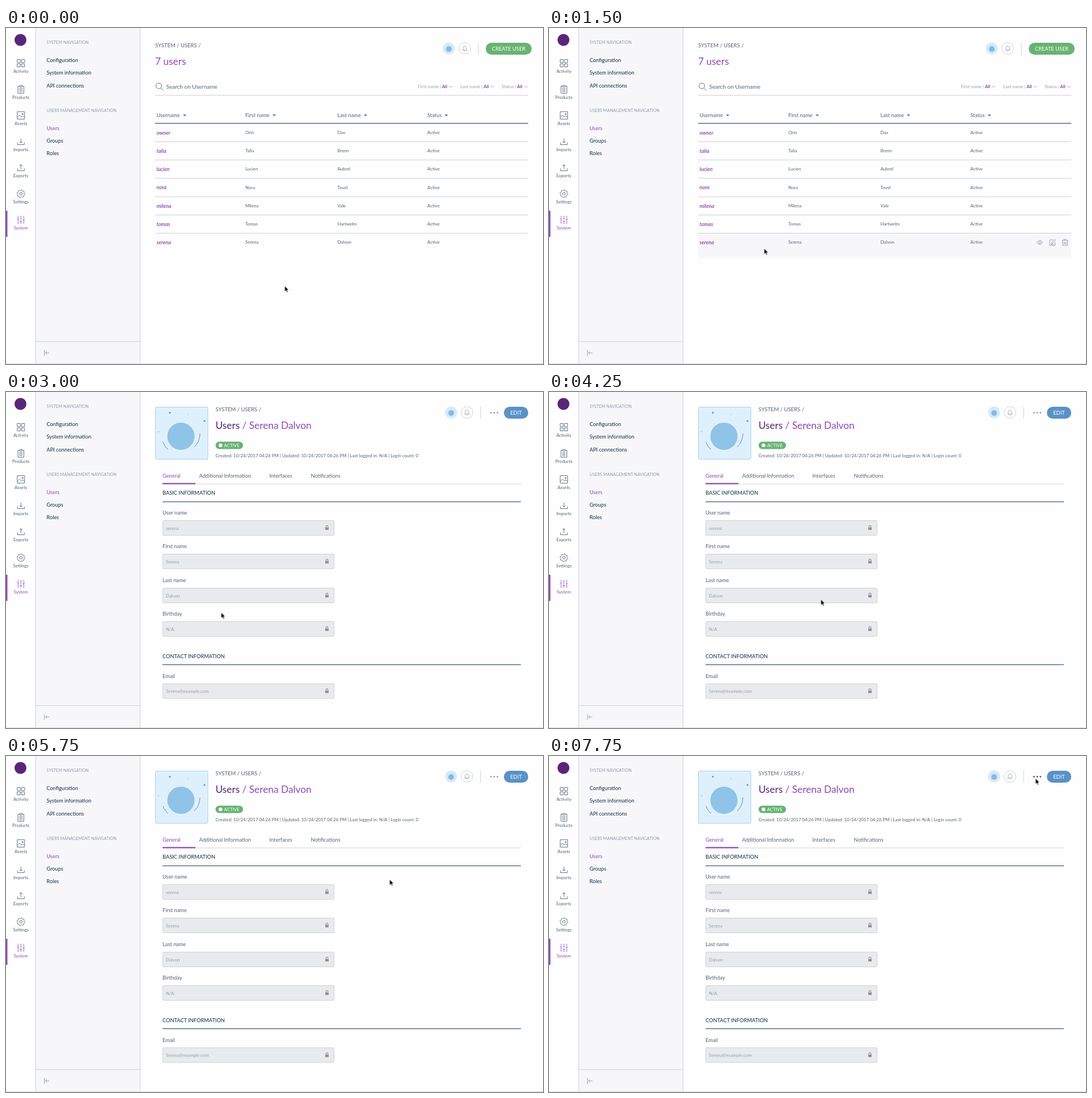
An HTML page that plays this animation: 947x592 px, repeating every 8 s.

```html
<!DOCTYPE html>
<html lang="en">
<head>
<meta charset="utf-8">
<title>User administration</title>
<style>
  html, body { margin: 0; width: 100%; height: 100%; overflow: hidden; background: #fefefe; }
  svg { display: block; font-family: Lato, "Open Sans", sans-serif; }
  text { white-space: pre; }
  .mid { text-anchor: middle; }
  .user { font-weight: 600; font-style: italic; }
  .icon { fill: none; stroke: #54637a; stroke-width: .9; }
  .soft { stroke: #949dac; }
  .brand { stroke: #9452ba; }

  #list, #hover, #veil, #detail, #dots, #cursor { animation: 8s step-end infinite; }
  #list { animation-name: list; }
  #hover { animation-name: hover; }
  #veil { animation-name: veil; }
  #detail { animation-name: detail; }
  #dots { animation-name: dots; }
  #cursor { animation-name: cursor; }

  @keyframes list { 0% { opacity: 1 } 34.375%, 100% { opacity: 0 } }
  @keyframes hover { 0% { opacity: 0 } 12.5% { opacity: .3 } 15.625%, 100% { opacity: 1 } }
  @keyframes veil { 0% { opacity: 0 } 34.375% { opacity: 1 } 37.5%, 100% { opacity: 0 } }
  @keyframes detail { 0% { opacity: 0 } 37.5%, 100% { opacity: 1 } }
  @keyframes dots { 0% { fill: #949dac } 93.75%, 100% { fill: #4f5b73 } }
  @keyframes cursor {
    0% { transform: translate(491.5px, 454.5px) }
    6.25% { transform: translate(411.5px, 419.5px) }
    9.375% { transform: translate(389.5px, 401px) }
    12.5% { transform: translate(381px, 391.5px) }
    15.625% { transform: translate(379.5px, 389.5px) }
    18.75% { transform: translate(379.5px, 388.5px) }
    46.875% { transform: translate(390.5px, 387px) }
    50% { transform: translate(441.5px, 380px) }
    53.125% { transform: translate(479.5px, 365.5px) }
    56.25% { transform: translate(518.5px, 344.5px) }
    59.375% { transform: translate(552.5px, 323.5px) }
    65.625% { transform: translate(590.5px, 303.5px) }
    68.75% { transform: translate(630.5px, 266.5px) }
    71.875% { transform: translate(676.5px, 217.5px) }
    75% { transform: translate(709px, 180.5px) }
    78.125% { transform: translate(709px, 179.5px) }
    81.25% { transform: translate(742px, 162px) }
    84.375% { transform: translate(805px, 117.5px) }
    87.5% { transform: translate(844.5px, 79px) }
    90.625% { transform: translate(856px, 52.5px) }
    93.75% { transform: translate(857px, 41px) }
    96.875%, 100% { transform: translate(858px, 39.5px) }
  }
</style>
</head>
<body>
<svg id="stage" width="947" height="592" viewBox="0 0 947 592"></svg>
<script>
const INK = '#0f2d47', SLATE = '#54637a', GREY = '#949dac', LINE = '#ccd1d8';
const PURPLE = '#9147b8', GREEN = '#67b373', BLUE = '#5992c7';

// cy is the middle of the capitals
const text = (x, cy, size, fill, str, cls = '') =>
  `<text x="${x}" y="${(cy + size * .36).toFixed(2)}" font-size="${size}" fill="${fill}" class="${cls}">${str}</text>`;
const rect = (x, y, w, h, fill, more = '') =>
  `<rect x="${x}" y="${y}" width="${w}" height="${h}" fill="${fill}" ${more}/>`;
const circle = (x, y, r, fill, more = '') =>
  `<circle cx="${x}" cy="${y}" r="${r}" fill="${fill}" ${more}/>`;
const icon = (x, y, d, cls = '') =>
  `<path class="icon ${cls}" transform="translate(${x} ${y})" d="${d}"/>`;
const ring = r => `M${-r} 0a${r} ${r} 0 1 0 ${2 * r} 0a${r} ${r} 0 1 0 ${-2 * r} 0`;

function gear() {
  const points = [];
  for (let i = 0; i < 32; i++) {
    const r = i % 4 < 2 ? 6.9 : 5.7, a = (i + .5) * Math.PI / 16;
    points.push((r * Math.cos(a)).toFixed(2) + ' ' + (r * Math.sin(a)).toFixed(2));
  }
  return 'M' + points.join('L') + 'Z' + ring(2.3);
}

const slider = (x, y) => `M${x}-7V${y - 2}M${x - 2} ${y}h4M${x} ${y}V7`;
const tray = 'M-6 1.5V5.5H6V1.5';
const menu = [
  ['Activity', 'M-6.5-6.5h5.4v5.4h-5.4zM1.1-6.5h5.4v5.4h-5.4zM-6.5 1.1h5.4v5.4h-5.4zM1.1 1.1h5.4v5.4h-5.4z'],
  ['Products', 'M-2-5.3H-5.2V7H5.2V-5.3H2M-2-6.8H2V-4H-2zM-3-1.2H3M-3 1.4H3M-3 4H3'],
  ['Assets', 'M-6.5-6.5h13v13h-13zM-6.5 3.5L-2.5-.5L1 3L3.5.8L6.5 3.6M2-3.2h2v1.5h-2z'],
  ['Imports', tray + 'M0-5V2.5M-2.6 0L0 2.6L2.6 0'],
  ['Exports', tray + 'M0 2.5V-5.3M-2.6-2.7L0-5.3L2.6-2.7'],
  ['Settings', gear()],
  ['System', slider(-5, -2) + slider(0, 2.5) + slider(5, -1)]
];

function navigation() {
  let s = rect(53, 0, 183, 591, '#f7f7f9') + rect(52, 0, 1, 591, LINE) + rect(236, 0, 1, 591, LINE);
  s += rect(53, 552, 183, 1, LINE) + circle(25.5, 21, 10.5, '#5a2578');
  menu.forEach(([label, d], i) => {
    const on = i === 6, y = 62 + 46 * i;
    s += icon(26.3, y, d, on ? 'brand' : '') + text(26.2, y + 14.3, 7.86, on ? PURPLE : SLATE, label, 'mid');
  });
  s += rect(0, 322, 2.5, 46, PURPLE);
  s += text(71.5, 25.7, 7.35, GREY, 'SYSTEM NAVIGATION');
  s += text(71.5, 145.5, 7.35, GREY, 'USERS MANAGEMENT NAVIGATION');
  const links = ['Configuration', 'System information', 'API connections', 'Users', 'Groups', 'Roles'];
  links.forEach((label, i) => {
    const y = i < 3 ? 56.7 + 22.4 * i : 176.3 + 22.4 * (i - 3);
    s += text(71.5, y, 9.25, i === 3 ? PURPLE : INK, label);
  });
  return s + icon(71.5, 572.5, 'M-4-5V5M5 0H-2M1-3L-2 0L1 3', 'soft');
}

// avatar, bell and separator shared by both pages
const tools = x =>
  circle(x, 36, 10.5, '#d4eaf9') + circle(x, 37, 5, '#85b9df') +
  circle(x + 28, 36, 10.3, '#fff', `stroke="${LINE}"`) +
  icon(x + 28, 36, 'M-4.2 3C-2.8 2-3 0-3-1.2C-3-5.4 3-5.4 3-1.2C3 0 2.8 2 4.2 3ZM-1.2 3.4C-.8 5 .8 5 1.2 3.4', 'soft') +
  rect(x + 51.5, 26, 1, 21, LINE);

const button = (x, w, fill, label) =>
  rect(x, 26, w, 21, fill, 'rx="10.5"') + text(x + w / 2, 36.4, 9.25, '#fff', label, 'mid');

const columns = [['Username', 265.5], ['First name', 422], ['Last name', 584.5], ['Status', 743]];
const users = [
  'owner Orin Dax', 'talia Talia Brenn', 'lucien Lucien Aubrel', 'nora Nora Tovel',
  'milena Milena Vale', 'tomas Tomas Hartwelm', 'serena Serena Dalvon'
];

function listPage() {
  let s = text(263, 31, 9.5, SLATE, 'SYSTEM / USERS /') + text(263, 58.6, 17.3, PURPLE, '7 users');
  s += tools(781) + button(846, 81, GREEN, 'CREATE USER');
  s += icon(269.5, 102, ring(5) + 'M3.6 3.6L8 8') + text(282.5, 103.8, 10, SLATE, 'Search on Username');
  [['First name', 726.5, 784], ['Last name', 801, 857.5], ['Status', 874, 917]].forEach(([label, x, end]) => {
    s += text(x, 103.3, 7.95, GREY, `${label} <tspan fill="#763e9e" font-weight="600">: All</tspan>`);
    s += icon(end, 103.3, 'M-3-1.5L0 1.5L3-1.5', 'soft');
  });
  s += rect(263, 118, 658, 1, LINE);
  s += '<g id="hover">' + rect(263, 362, 658, 43, '#f7f7f9') +
    icon(865.5, 377.7, 'M-5.5 0Q0-6.5 5.5 0Q0 6.5-5.5 0' + ring(1.8), 'soft') +
    icon(888, 377.7, 'M1-4.5H-5V5.5H4.5V0M-2 2.5L-1.5 0L4-5.5L5.5-4L0 2ZM-3 3.8H2.5', 'soft') +
    icon(910, 377.7, 'M-5.5-3.5H5.5M-2-3.5V-5.5H2V-3.5M-4.3-3.5V5.5H4.3V-3.5M-2-1V3.5M0-1V3.5M2-1V3.5', 'soft') + '</g>';
  const carets = [315, 473, 634, 776.5];
  columns.forEach(([label, x], i) => {
    s += text(x, 153.6, 9.25, SLATE, label);
    s += `<path d="M${carets[i] - 2.9} 152.6h5.8l-2.9 3z" fill="${SLATE}"/>`;
  });
  s += rect(263, 167.3, 658, 1.4, '#4d607a');
  users.forEach((user, i) => {
    const y = 184.2 + 32.2 * i;
    (user + ' Active').split(' ').forEach((cell, j) => {
      s += j ? text(columns[j][1], y, 7.86, SLATE, cell) : text(265.5, y + .2, 9.3, '#8640ae', cell, 'user');
    });
    if (i < 6) s += rect(263, Math.round(y + 15.8), 658, 1, LINE);
  });
  return s;
}

const lock = (x, y) =>
  rect(x - 3, y - 1, 6, 4.6, '#8a919e', 'rx=".6"') +
  `<path d="M${x - 1.9} ${y - 1}v-1.2a1.9 1.9 0 0 1 3.8 0v1.2" fill="none" stroke="#8a919e" stroke-width="1.1"/>`;

const field = (label, value, y) =>
  text(276, y, 9.3, SLATE, label) +
  rect(276.5, y + 13.5, 302, 26, '#e9eaee', `stroke="${LINE}" rx="1"`) +
  text(282, y + 26.8, 7.9, GREY, value) + lock(566, y + 26.5);

const section = (label, y) =>
  text(276, y, 9.25, INK, label) + rect(276, Math.round(y + 15), 632, 1, '#1f3d57');

function portrait() {
  const star = (x, y) => `M${x - 2} ${y}h4M${x} ${y - 2}v4`;
  return rect(263.5, 26.5, 92.5, 92, '#dff0fd', 'stroke="#a9cfe8" rx="2"') +
    circle(308.5, 78, 24, '#8fc3e8') +
    `<path d="${star(289, 36.5)}${star(350, 51)}M277 88Q279 96 286 101M342 73Q342 87 332 97M268 70h2M320 40h1" fill="none" stroke="#456f95" stroke-width=".8"/>`;
}

function detailPage() {
  let s = portrait() + text(369.5, 31, 9.5, SLATE, 'SYSTEM / USERS /');
  s += text(369.5, 58.6, 17.3, '#52267d', `Users <tspan fill="${PURPLE}">/ Serena Dalvon</tspan>`);
  s += rect(369.5, 87.5, 48.5, 13, GREEN, 'rx="6.5"') + circle(378.3, 94, 3.3, '#fff');
  s += text(384.5, 94, 7.9, '#fff', 'ACTIVE');
  const stamp = '10/24/2017 04:26 PM';
  s += text(369.5, 112.4, 7.88, SLATE, `Created: ${stamp} | Updated: ${stamp} | Last logged in: N/A | Login count: 0`);
  s += tools(785) + button(878, 43, BLUE, 'EDIT');
  s += '<g id="dots">' + [855.3, 861, 866.7].map(x => `<circle cx="${x}" cy="36.5" r="1.4"/>`).join('') + '</g>';
  s += rect(276, 161.5, 632, 1, LINE) + rect(276, 160.3, 58, 2.2, PURPLE);
  [['General', 276], ['Additional Information', 340.5], ['Interfaces', 464.5], ['Notifications', 537.5]]
    .forEach(([label, x], i) => { s += text(x, 147.6, 9.25, i ? SLATE : PURPLE, label); });
  s += section('BASIC INFORMATION', 177.8);
  [['User name', 'serena'], ['First name', 'Serena'], ['Last name', 'Dalvon'], ['Birthday', 'N/A']]
    .forEach(([label, value], i) => { s += field(label, value, 213 + Math.round(59.3 * i)); });
  return s + section('CONTACT INFORMATION', 465.2) + field('Email', 'Serena@example.com', 500.5);
}

const spinner = circle(473.5, 295.5, 8.2, 'none',
  'stroke="#6b2fa0" stroke-width="1.3" stroke-dasharray="5.2 3.387" transform="rotate(12 473.5 295.5)"');
const arrow = '<path id="cursor" d="M0 0V10L2.4 7.9L4 11.6L5.6 10.9L4.1 7.3H7.1Z" fill="#000" stroke="#fff" stroke-width=".7"/>';

document.getElementById('stage').innerHTML =
  rect(0, 0, 947, 592, '#fefefe') + navigation() +
  `<g id="list">${listPage()}</g><g id="detail">${detailPage()}</g>` +
  `<g id="veil">${rect(0, 0, 947, 592, '#fefefe', 'opacity=".8"')}${spinner}</g>` +
  rect(0, 591, 947, 1, '#dcdcde') + arrow;
</script>
</body>
</html>
```
